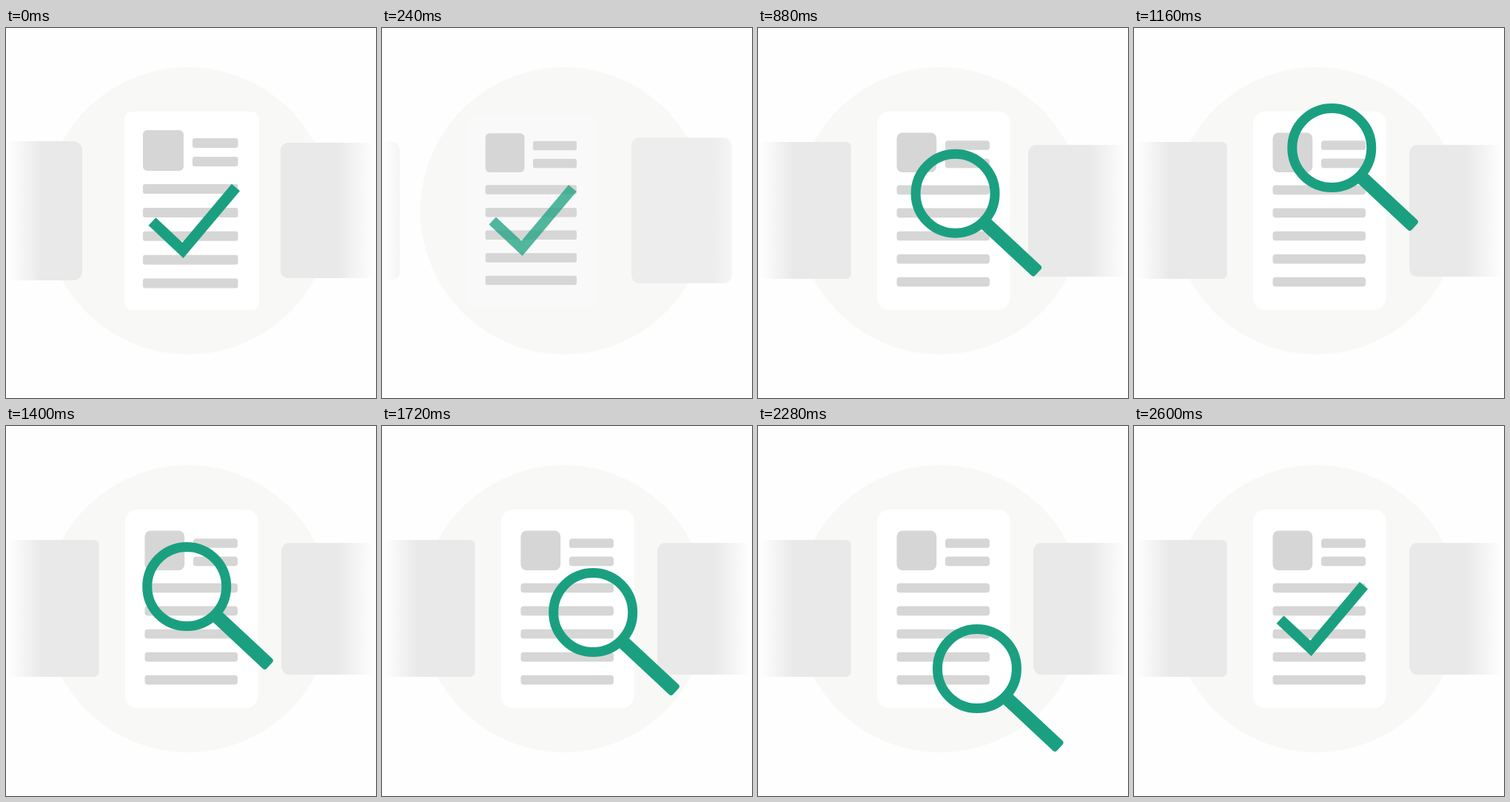
An HTML page with a canvas for the animation above (2.92 s loop, 500 by 500 pixels).

```html
<!DOCTYPE html>
<html lang="en">
<head>
<meta charset="utf-8">
<title>Document review</title>
<style>
  html, body { margin: 0; width: 100%; height: 100%; overflow: hidden; background: #fefefe; }
  canvas { display: block; width: 500px; height: 500px; }
</style>
</head>
<body>
<canvas id="stage" width="500" height="500"></canvas>
<script>
const ctx = document.getElementById('stage').getContext('2d');
const LOOP = 2920, STEP = 40;
const GREEN = '#1aa080', BAR = [214, 214, 214], TINT = [212, 225, 223];
const GRAY = [233, 233, 233], WHITE = [255, 255, 255];

const lerp = (a, b, p) => a + (b - a) * p;
const mix = (a, b, p) => a.map((v, i) => lerp(v, b[i], p));
const rgb = c => `rgb(${c.map(Math.round)})`;
const ramp = (t, from, to) => Math.min(1, Math.max(0, (t - from) / (to - from)));
const ease = (t, from, to) => (1 - Math.cos(Math.PI * ramp(t, from, to))) / 2;

function box(x, y, w, h, r, fill) {
  ctx.fillStyle = fill;
  ctx.beginPath();
  ctx.roundRect(x, y, w, h, Math.min(r, w / 2));
  ctx.fill();
}

// Runs draw in its own state with a given opacity
function layer(alpha, draw) {
  if (alpha <= 0) return;
  ctx.save();
  ctx.globalAlpha = alpha;
  draw();
  ctx.restore();
}

// Scales around a pivot, then moves the pivot to (x, y)
function place(x, y, s, pivotX, pivotY) {
  ctx.translate(x, y);
  ctx.scale(s, s);
  ctx.translate(-pivotX, -pivotY);
}

// A portrait, two short lines beside it and five long ones below.
// grown(i) is the share of line i that is written so far.
function drawContent(radius, tint, grown) {
  const alpha = ctx.globalAlpha;
  box(185, 138, 55, 55, radius * 2, tint);
  for (let i = 0; i < 7; i++) {
    const p = grown(i), short = i < 2;
    ctx.globalAlpha = alpha * p;
    box(short ? 252 : 185, short ? 149 + 25 * i : 211 + 31.9 * (i - 2),
      (short ? 61.5 : 128.5) * p, 13, radius, i ? rgb(BAR) : tint);
  }
}

function drawCheck(amount) {
  ctx.strokeStyle = GREEN;
  ctx.lineWidth = 14.5;
  ctx.setLineDash([169 * amount, 400]);
  ctx.beginPath();
  ctx.moveTo(197.5, 261.5);
  ctx.lineTo(239, 300.5);
  ctx.lineTo(310.5, 215.5);
  ctx.stroke();
}

// The magnifier flies in, reads three rows in a zigzag and leaves
function lensAt(t) {
  const start = 1000, sweep = 240, period = 520;
  const rowY = i => 162 + 97 * i - 7 * i * i;
  const left = i => [217 + 2 * i, rowY(i)];
  const right = i => [284 + 6 * i, rowY(i)];
  if (t < start) return mix([369, 351], left(0), ease(t, 690, start));

  const row = Math.min(2, Math.floor((t - start) / period));
  const u = t - start - row * period;
  if (u < sweep) return mix(left(row), right(row), ease(u, 0, sweep));
  const next = row < 2 ? left(row + 1) : [520, 580];
  return mix(right(row), next, ease(u, sweep, period));
}

function drawLens(x, y) {
  ctx.translate(x, y);
  ctx.strokeStyle = GREEN;
  ctx.lineWidth = 13;
  ctx.beginPath();
  ctx.arc(0, 0, 53.5, 0, 2 * Math.PI);
  ctx.stroke();
  ctx.rotate(0.75);
  box(54, -7.5, 100.5, 18.5, 4, GREEN);
}

function drawOldPage(t) {
  const p = ease(t, 80, 555), shrink = p ** 1.5;
  box(-30 - 310 * p, 153, 133, 188, 12, rgb(GRAY));

  layer(1, () => {
    place(251 - 188 * p, 247 - 0.5 * p, 1 - 0.31 * shrink, 251, 247);
    box(160, 113, 182, 268, 10, rgb(mix(WHITE, GRAY, p)));
    ctx.globalAlpha = 1 - ramp(t, 280, 480);
    drawContent(3, rgb(BAR), () => 1);
  });

  layer(1 - ramp(t, 80, 720), () => {
    place(254 - 198.5 * p, 261 - 4 * p, 1 - 0.33 * shrink, 254, 261);
    drawCheck(1);
  });
}

function drawNewPage(t) {
  const p = ease(t, 70, 715);
  const [x, y, w, h, r] = mix([371, 155, 127, 183, 10], [161, 113, 180, 268, 16], p);
  box(x, y, w, h, r, rgb(mix(GRAY, WHITE, p)));

  layer(ramp(t, 360, 600), () => {
    place(x + w / 2, y + h / 2, h / 268, 251, 247);
    ctx.transform(0.977, 0, 0, 0.974, 6.75, 7);
    const tint = rgb(mix(TINT, BAR, ramp(t, 600, 720)));
    drawContent(4, tint, i => ramp(t - STEP * i, 400, 640));
  });
}

function drawNextCard(t) {
  const p = ease(t, 300, 880);
  box(505 - 140 * p + 7 * ease(t, 880, 1120), 160 - 2 * p, 137, 178, 11, rgb(GRAY));
}

function fadeEdge(from, to) {
  const g = ctx.createLinearGradient(from, 0, to, 0);
  g.addColorStop(0, 'rgba(254,254,254,0)');
  g.addColorStop(1, 'rgb(254,254,254)');
  ctx.fillStyle = g;
  ctx.fillRect(Math.min(from, to) - 5, 0, 60, 500);
}

function draw(t) {
  ctx.fillStyle = '#fefefe';
  ctx.fillRect(0, 0, 500, 500);
  ctx.fillStyle = '#f8f8f6';
  ctx.beginPath();
  ctx.arc(246, 247, 194, 0, 2 * Math.PI);
  ctx.fill();

  drawNextCard(t);
  drawOldPage(t);
  drawNewPage(t);
  layer(ramp(t, 2360, 2400), () => drawCheck(ease(t, 2340, 2600)));
  layer(ramp(t, 620, 720), () => drawLens(...lensAt(t)));

  fadeEdge(48, 3);
  fadeEdge(448, 497);
}

function tick() {
  const t = performance.now() % LOOP;
  draw(Math.floor(t / STEP) * STEP);
  requestAnimationFrame(tick);
}
tick();
</script>
</body>
</html>
```
